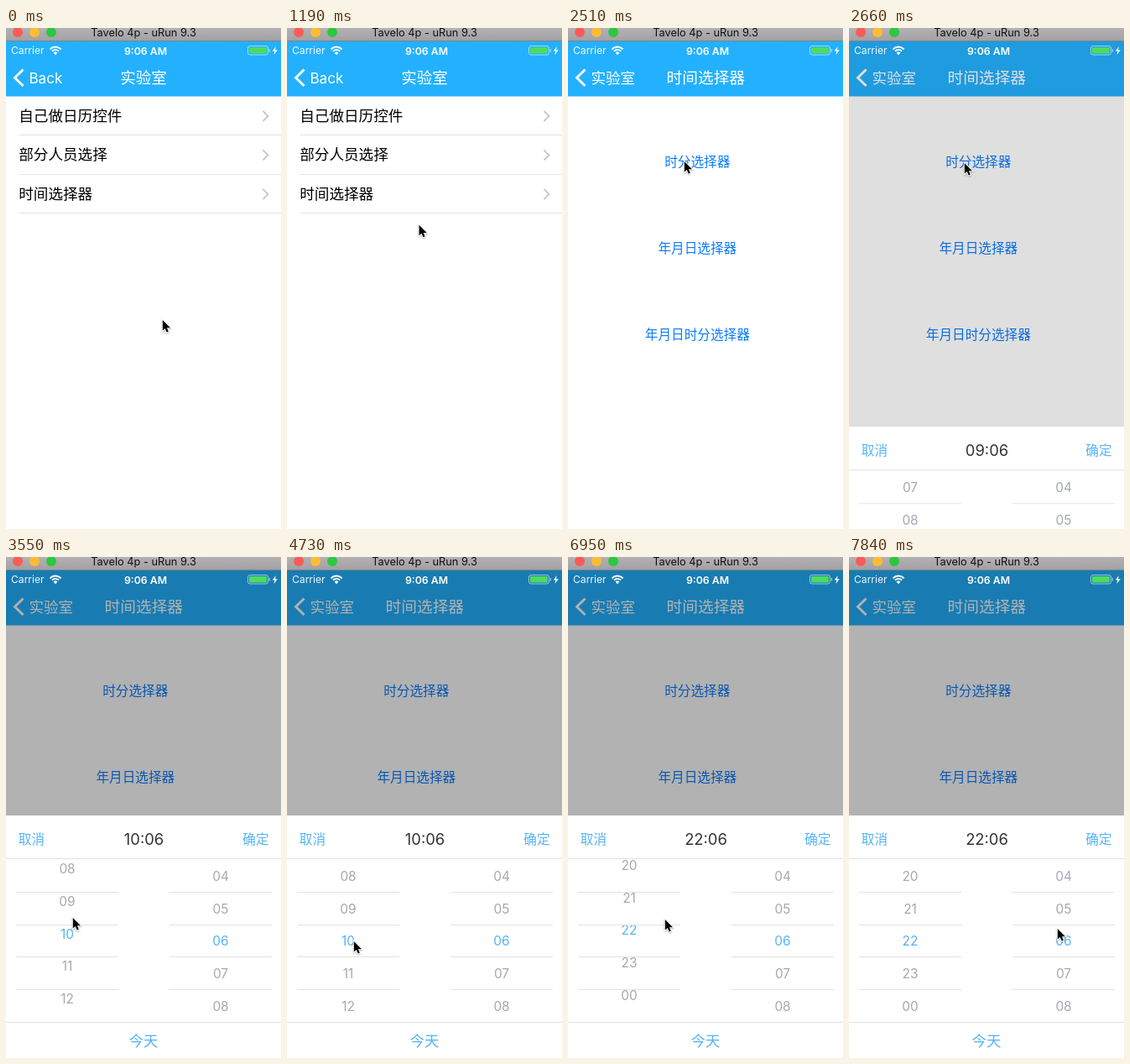
Write an HTML page with a canvas that moves like this. It is 328 by 597 pixels and loops after 7.99 s.

```html
<!DOCTYPE html>
<html lang="zh-CN">
<head>
<meta charset="utf-8">
<style>
  html, body { margin: 0; width: 100%; height: 100%; overflow: hidden; background: #fff; }
  canvas { display: block; width: 328px; height: 597px; }
</style>
</head>
<body>
<canvas id="stage"></canvas>
<script>
const W = 328, H = 597, LOOP = 7990;
const FIRST_HOLD = 880, TICK = 147.4;
const FONT = 'Inter, "Noto Sans CJK SC", "Noto Sans CJK", sans-serif';
const BLUE = '#23b1ff', ACCENT = '#55b3f3', LINK = '#0b7bff', LINE = '#e2e2e4';
const ROW = 38.65, CENTER = 457.8;

const canvas = document.getElementById('stage');
const ctx = canvas.getContext('2d');
const scale = window.devicePixelRatio || 1;
canvas.width = W * scale;
canvas.height = H * scale;

const lerp = (a, b, u) => a + (b - a) * u;
const clamp = v => Math.min(1, Math.max(0, v));
const easeOut = v => 1 - (1 - clamp(v)) ** 3;
const pad = n => String(n).padStart(2, '0');

// Pointer stops: tick, x, y
const POINTER = [
  [-1, 186, 347], [3, 147, 196], [5, 145, 190], [8, 143, 182], [11, 138, 158],
  [13, 136, 162], [15, 84, 468], [16, 82, 462], [18, 79, 429], [19, 79, 427],
  [21, 79, 427], [25, 79, 457], [26, 79, 457], [29, 115, 431], [45, 115, 431],
  [46, 200, 438], [47, 248, 442]
];
// Hour wheel stops: tick, hour
const WHEEL = [[15, 9], [18, 10.23], [19, 10.3], [21, 10.3], [24, 10.04], [25, 10], [26, 10], [28, 17.2]];
const SETTLE = [[43, 22.39], [44, 22.2], [45, 22.06], [46, 22.02], [47, 22]];

function track(stops, k) {
  if (k <= stops[0][0]) return stops[0].slice(1);
  const i = stops.findIndex(s => s[0] >= k);
  if (i < 0) return stops[stops.length - 1].slice(1);
  const a = stops[i - 1], b = stops[i], u = (k - a[0]) / (b[0] - a[0]);
  return a.slice(1).map((v, j) => lerp(v, b[j + 1], u));
}

function hourAt(k) {
  if (k <= 28) return track(WHEEL, k)[0];
  if (k >= 43) return track(SETTLE, k)[0];
  return 22.45 - 5.25 * Math.exp((28 - k) * 0.295);
}

function rect(x, y, w, h, color) {
  ctx.fillStyle = color;
  ctx.fillRect(x, y, w, h);
}

// y is the visual middle of the line
function text(str, x, y, size, color, align = 'left', weight = 400) {
  ctx.font = `${weight} ${size}px ${FONT}`;
  ctx.textAlign = align;
  ctx.fillStyle = color;
  ctx.fillText(str, x, y + size * 0.37);
}

function stroke(path, width, color) {
  ctx.lineWidth = width;
  ctx.strokeStyle = color;
  ctx.stroke(new Path2D(path));
}

function faded(alpha, draw) {
  ctx.save();
  ctx.globalAlpha = clamp(alpha);
  draw();
  ctx.restore();
}

function shifted(x, y, draw) {
  ctx.save();
  ctx.translate(x, y);
  draw();
  ctx.restore();
}

function listPage(selected) {
  rect(0, 81, W, 516, '#fff');
  if (selected) rect(0, 174, W, 47, '#dcdcdc');
  ['自己做日历控件', '部分人员选择', '时间选择器'].forEach((label, i) => {
    const y = 104.5 + i * 46.5;
    text(label, 15.2, y - 0.5, 17.6, '#000');
    stroke(`M306.5 ${y - 5.5}l6 6l-6 6`, 1.8, '#c7c7cc');
    rect(16, Math.round(y + 22.5), W, 1, LINE);
  });
}

function buttonPage() {
  rect(0, 81, W, 516, '#fff');
  ['时分选择器', '年月日选择器', '年月日时分选择器'].forEach((label, i) =>
    text(label, 154.3, 159 + i * 103, 15.65, LINK, 'center'));
}

function navBar(p) {
  rect(0, 16, W, 65.5, BLUE);
  stroke('M20.5 49.5L10.5 59.3L20.5 69', 2.9, `rgba(255,255,255,${1 - 0.6 * p * (1 - p)})`);
  faded(1 - 1.8 * p, () => text('Back', 27.5, 59.5, 17, '#fff'));
  faded(1 - 1.1 * p * (1 - p), () =>
    text('实验室', lerp(136.3, 27.5, p * 0.9 + p ** 4 * 0.1), 59.5, lerp(18.5, 17.5, p), '#fff'));
  if (p) faded(p ** 1.4, () => text('时间选择器', 164.3 + 234 * (1 - p), 59.5, 18.7, '#fff', 'center'));
}

function pages(p, selected) {
  if (p < 1) {
    shifted(-98.4 * p, 0, () => listPage(selected));
    rect(0, 81, W, 516, `rgba(0,0,0,${0.1 * p})`);
  }
  if (p > 0) shifted(Math.round(W * (1 - p)), 0, () => {
    if (p < 1) rect(-4, 82, 4, 515, 'rgba(0,0,0,.05)');
    buttonPage();
  });
  navBar(p);
}

function wheel(x, value, count) {
  const current = Math.floor(value + 1e-6);
  for (let n = current - 3; n <= current + 4; n++) {
    text(pad((n + count) % count), x, CENTER + (n - value) * ROW, 15.4,
      n === current ? ACCENT : '#a5a8b2', 'center');
  }
  for (let i = 0; i < 4; i++) rect(x - 61, Math.round(399 + i * ROW), 122, 1, LINE);
}

function sheet(hour) {
  rect(0, 308, W, 289, '#fff');
  text('取消', 14.8, 336, 15.6, ACCENT);
  text('确定', 313.5, 336, 15.6, ACCENT, 'right');
  text(`${pad(Math.floor(hour + 1e-6) % 24)}:06`, 164.5, 336, 18.4, '#333', 'center');
  ctx.save();
  ctx.beginPath();
  ctx.rect(0, 360, W, 194);
  ctx.clip();
  wheel(73, hour, 24);
  wheel(256, 6, 60);
  ctx.restore();
  rect(0, 359, W, 1, LINE);
  rect(0, 554, W, 1, LINE);
  text('今天', 164, 577, 17.4, ACCENT, 'center');
}

function statusBar() {
  text('Carrier', 6, 27, 12.1, 'rgba(255,255,255,.92)');
  text('9:06 AM', 166.5, 27, 12.3, '#fff', 'center', 600);
  [[9, 1.9], [5.6, 1.9]].forEach(([r, w]) => {
    ctx.beginPath();
    ctx.arc(59, 31.5, r, -Math.PI * 0.76, -Math.PI * 0.24);
    ctx.lineWidth = w;
    ctx.strokeStyle = '#fff';
    ctx.stroke();
  });
  ctx.fillStyle = '#fff';
  ctx.fill(new Path2D('M59 32.3l-2.4-2.8a3.4 3.4 0 0 1 4.8 0z'));
  ctx.beginPath();
  ctx.roundRect(288.5, 21.5, 24, 10.5, 2.5);
  ctx.lineWidth = 1;
  ctx.strokeStyle = 'rgba(255,255,255,.55)';
  ctx.stroke();
  ctx.beginPath();
  ctx.roundRect(290, 23, 21, 7.5, 1.2);
  ctx.fillStyle = '#4cdb62';
  ctx.fill();
  rect(313.7, 25, 1.3, 3.6, 'rgba(255,255,255,.55)');
  ctx.fillStyle = '#fff';
  ctx.fill(new Path2D('M321.8 22l-4 5.4h2.6l-1 4.6l4.4-5.8h-2.8z'));
}

function windowBar() {
  const shade = ctx.createLinearGradient(0, 0, 0, 15);
  shade.addColorStop(0, '#b3b1b3');
  shade.addColorStop(1, '#a3a1a3');
  rect(0, 0, W, 15, shade);
  rect(0, 15, W, 1, '#7e8388');
  ['#fc5b57', '#fdbc33', '#2bc840'].forEach((color, i) => {
    ctx.beginPath();
    ctx.arc(14 + i * 20, 5, 6, 0, Math.PI * 2);
    ctx.fillStyle = color;
    ctx.fill();
  });
  text('Tavelo 4p - uRun 9.3', 164, 5.2, 12.8, '#111', 'center');
}

function pointer(x, y) {
  const arrow = new Path2D('M.8 1V13.6L3.7 10.9L5.7 15.6L7.8 14.7L5.9 10.2H10Z');
  shifted(x, y, () => {
    ctx.save();
    ctx.shadowColor = 'rgba(0,0,0,.3)';
    ctx.shadowBlur = 2 * scale;
    ctx.shadowOffsetY = scale;
    ctx.lineWidth = 1.8;
    ctx.strokeStyle = '#fff';
    ctx.stroke(arrow);
    ctx.restore();
    ctx.fillStyle = '#000';
    ctx.fill(arrow);
  });
}

function render(now) {
  const k = Math.max(-1, Math.floor((now % LOOP - FIRST_HOLD) / TICK));
  const push = easeOut((k - 4) / 3.44);
  const rise = easeOut((k - 11.6) / 2.4);

  ctx.setTransform(scale, 0, 0, scale, 0, 0);
  rect(0, 0, W, H, '#fff');
  pages(push, k >= 4);
  if (rise) {
    rect(0, 16, W, 581, `rgba(0,0,0,${0.3 * rise})`);
    shifted(0, 289 * (1 - rise), () => sheet(hourAt(k)));
  }
  statusBar();
  windowBar();
  pointer(...track(POINTER, k));
}

const start = performance.now();
function tick() {
  render(performance.now() - start);
  requestAnimationFrame(tick);
}
tick();
</script>
</body>
</html>
```
